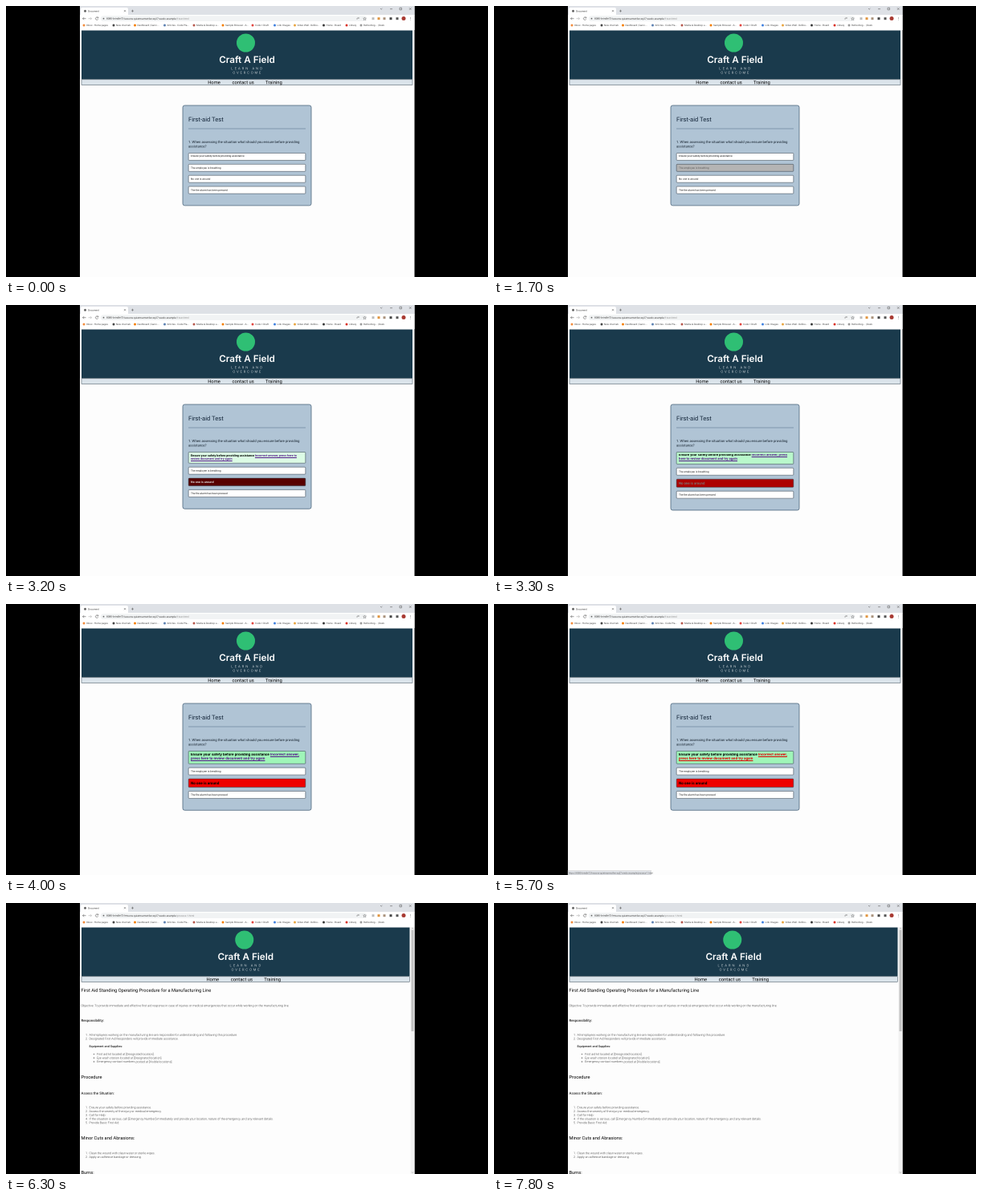
An HTML page that plays this animation: 600 px wide and 338 px high, repeating every 7.9 s.

```html
<!DOCTYPE html>
<html lang="en">
<head>
<meta charset="utf-8">
<title>First-aid test</title>
<style>
  html, body { margin: 0; height: 100%; overflow: hidden; background: #000; }
  svg { display: block; width: 100vw; height: 100vh; }
  /* The tiny turn switches off hinting, so small type keeps its true spacing. */
  text, #answer {
    font-family: Roboto, sans-serif;
    text-rendering: geometricPrecision;
    transform: rotate(.03deg);
    transform-origin: center;
  }
  text { transform-box: fill-box; }
  .logo { font-family: Inter, sans-serif; fill: #fff; text-anchor: middle; }
  #answer { line-height: 1.12; color: #000; }
  #answer a { text-decoration: underline; text-decoration-thickness: .4px; }
</style>
</head>
<body>
<svg id="stage" viewBox="0 0 600 338"></svg>
<script>
const LOOP = 7900;
const HOVER_SECOND = 1600, HOVER_THIRD = 1700, CLICK = 3085;
const STATUS_IN = 4750, PRESS = 5700, NEXT_PAGE = 5800, LOADED = 6000, STATUS_OUT = 6050;
const HOST = '8080-brindle72-lessons-quietmarmotfen-zq27.wexlo.example';
const RED = [238, 0, 0], GREEN = [159, 245, 184], WHITE = [255, 255, 255], BLACK = [0, 0, 0];
const SMALL = 3.23, LARGE = 4.65, LINE_HEIGHT = 1.12, PADDING = 5.35, GAP = 4.9;

const text = (x, y, size, content, attrs = '') =>
  `<text x="${x}" y="${y}" font-size="${size}" ${attrs}>${content}</text>`;
const rect = (x, y, w, h, fill, attrs = '') =>
  `<rect x="${x}" y="${y}" width="${w}" height="${h}" fill="${fill}" ${attrs}/>`;
const dot = (x, y, r, fill) => `<circle cx="${x}" cy="${y}" r="${r}" fill="${fill}"/>`;
const line = (d, stroke, width = 0.6) =>
  `<path d="${d}" fill="none" stroke="${stroke}" stroke-width="${width}"/>`;

function browserFrame() {
  const bookmarks = [
    [97, '#f28b3c', 'Inbox - Home pages'], [134, '#444', 'New chat tab'],
    [160.5, '#f57c00', 'Dashboard | Gain i...'], [197.5, '#5a7fb0', 'Articles - Code Pla...'],
    [234, '#b5564a', 'Media &amp; Desktop u...'], [270, '#f57c00', 'Sample Browser - A...'],
    [307, '#e0443e', 'Code + Draft'], [334.5, '#3b7ddd', 'Link Images'],
    [359.5, '#e8a33d', 'Video Wall - Define...'], [395.5, '#333', 'Home - Board'],
    [424, '#d93025', 'Library'], [442, '#999', 'Refreshing... | Desk']
  ];
  const extensions = [[457, '#bbb'], [464, '#e0943e'], [471, '#a9927c'], [479, '#444'], [487, '#555']];
  return rect(92, 0, 416.5, 338, '#fdfdfd') + rect(92, 0, 416.5, 11.5, '#dee1e6') +
    '<path d="M93 11.5V4Q93 2 95 2H150Q152 2 152 4V11.5Z" fill="#fff"/>' +
    rect(92, 11, 416.5, 19, '#fff') +
    dot(98.5, 6.3, 1.5, '#666') +
    line('M147 5.2l2 2m0-2l-2 2M156 6.2h3M157.5 4.7v3', '#444', .5) +
    line('M466 3l1.2 1.2L468.4 3M478 3.7h3M490 2.3h2.5v2.5h-2.5zM502 2.3l2.5 2.5m0-2.5l-2.5 2.5', '#444', .5) +
    rect(118, 12.3, 331, 6.8, '#f1f3f4', 'rx="3.4"') +
    line('M99.5 15.7h-4m1.5-1.5l-1.5 1.5l1.5 1.5', '#555') +
    line('M102.5 15.7h4m-1.5-1.5l1.5 1.5l-1.5 1.5', '#aaa') +
    `<g id="reload">${line('M114.6 14.7a1.7 1.7 0 1 0 .1 1.7M114.8 13.5v1.4h-1.4', '#555')}</g>` +
    `<g id="stop">${line('M111.5 14.2l3 3m0-3l-3 3', '#444')}</g>` +
    line('M437 17v-2h2.5m-1-1l1 1l-1 1M446.5 14l.6 1.3h1.3l-1 .9l.3 1.4l-1.2-.7l-1.2.7l.3-1.4l-1-.9h1.3z', '#666', .45) +
    extensions.map(([x, c]) => rect(x - 1.5, 14.2, 3, 3, c)).join('') +
    dot(495, 15.6, 2.5, '#a83a32') +
    [14.3, 15.7, 17.1].map(y => dot(503.5, y, .4, '#444')).join('') +
    bookmarks.map(([x, c, label]) => dot(x, 24, 1.5, c) + text(x + 3, 25, 3.05, label, 'fill="#444"')).join('') +
    text(102, 7.4, 3, '', 'id="tab" fill="#333"') +
    dot(121.5, 15.7, .9, '#666') +
    `<text x="125" y="16.9" font-size="3.2" fill="#333">${HOST}<tspan id="path" fill="#888"></tspan></text>`;
}

function siteHeader(width) {
  const mid = 94 + width / 2;
  return rect(94, 30.5, width, 61, '#1a3a4c') +
    dot(mid - 1.5, 46, 11.5, '#2fbf74') +
    text(mid, 71, 11.7, 'Craft A Field', 'class="logo" font-weight="600"') +
    text(mid + .7, 79.2, 4, 'LEARN AND', 'class="logo" font-weight="300" letter-spacing="2"') +
    text(mid + .7, 84.6, 4, 'OVERCOME', 'class="logo" font-weight="300" letter-spacing="1.8"') +
    rect(94, 91.8, width, 6.9, '#dbe4eb', 'stroke="#3f4d58" stroke-width=".5"') +
    [[-48.8, 'Home'], [-18.5, 'contact us'], [23, 'Training']]
      .map(([dx, label]) => text(mid + dx, 97.3, 5.8, label)).join('');
}

function testPage() {
  const labels = ['', 'The employee is breathing', 'No one is around', 'The fire alarm has been pressed'];
  const option = label => `<g class="option">
    ${rect(227.2, 0, 145.6, 9, '#fff', 'rx=".8" stroke="#2b3742" stroke-width=".5"')}
    ${text(230, 0, SMALL, label)}</g>`;
  return siteHeader(412) +
    rect(220, 124, 160, 125, '#b0c4d5', 'id="card" rx="2.5" stroke="#3a566f" stroke-width=".7"') +
    text(227, 144, 7.6, 'First-aid Test', 'fill="#14263a"') +
    line('M227 153H373', '#5b7890', .6) +
    text(227, 171, 4.29, '1. When assessing the situation what should you ensure before providing', 'fill="#14202c"') +
    text(227, 176.5, 4.29, 'assistance?', 'fill="#14202c"') +
    labels.map(option).join('') +
    `<foreignObject x="230" y="186.1" width="142" height="16">
      <div xmlns="http://www.w3.org/1999/xhtml" id="answer">Ensure your safety before providing assistance <a id="link">Incorrect answer, press here to review document and try again</a></div>
    </foreignObject>`;
}

function procedurePage() {
  const pitch = 4.72;
  const heading = (y, label) => text(93.5, y, 5.7, label);
  const subheading = (y, label, x = 93.5, size = 4.36) => text(x, y, size, label, 'font-weight="500" fill="#222"');
  const body = (x, y, label) => text(x, y, 3.78, label, 'font-weight="300" fill="#222"');
  const numbered = (y, items) => items.map((item, i) =>
    body(99, y + i * pitch, `${i + 1}.`) + body(103.5, y + i * pitch, item)).join('');
  const bulleted = (y, items) => items.map((item, i) =>
    dot(109.5, y - 1.2 + i * pitch, .6, '#333') + body(113, y + i * pitch, item)).join('');
  return siteHeader(408.5) +
    rect(503.5, 30, 5, 308, '#f1f1f1') + rect(504.5, 33.5, 3, 126.5, '#c1c1c1') +
    line('M505 32.2l1-1l1 1M505 335.5l1 1l1-1', '#777', .5) +
    heading(110.8, 'First Aid Standing Operating Procedure for a Manufacturing Line') +
    body(93.5, 129.3, 'Objective: To provide immediate and effective first aid response in case of injuries or medical emergencies that occur while working on the manufacturing line.') +
    subheading(148, 'Responsibility:') +
    numbered(165.8, [
      'All employees working on the manufacturing line are responsible for understanding and following this procedure.',
      'Designated First Aid Responders will provide immediate assistance.']) +
    subheading(180, 'Equipment and Supplies:', 103.5, 3.78) +
    bulleted(189.7, [
      'First aid kit located at [Designated location].',
      'Eye wash station located at [Designated location].',
      'Emergency contact numbers posted at [Visible locations].']) +
    heading(219, 'Procedure') +
    subheading(238.8, 'Assess the Situation:') +
    numbered(256.3, [
      'Ensure your safety before providing assistance.',
      'Assess the severity of the injury or medical emergency.',
      'Call for Help:',
      'If the situation is serious, call [Emergency Number] immediately and provide your location, nature of the emergency, and any relevant details.',
      'Provide Basic First Aid:']) +
    heading(295, 'Minor Cuts and Abrasions:') +
    numbered(313.3, [
      'Clean the wound with clean water or sterile wipes.',
      'Apply an adhesive bandage or dressing.']) +
    heading(338, 'Burns:');
}

const statusBar = () =>
  rect(92, 332.8, 103.5, 5.2, '#dee1e6', 'stroke="#bbb" stroke-width=".4"') +
  text(93, 336.5, 2.8, `https://${HOST}/process-1.html`, 'fill="#555"');

document.getElementById('stage').innerHTML = browserFrame() +
  `<g id="test">${testPage()}</g><g id="procedure">${procedurePage()}</g><g id="status">${statusBar()}</g>`;

const part = id => document.getElementById(id);
const options = [...document.querySelectorAll('.option')].map(g => ({
  box: g.querySelector('rect'), label: g.querySelector('text')
}));

const clamp = v => Math.min(1, Math.max(0, v));
const mix = (a, b, p) => a.map((v, i) => v + (b[i] - v) * p);
const rgb = c => `rgb(${c.map(Math.round)})`;
const show = (id, on) => part(id).setAttribute('display', on ? 'inline' : 'none');

function setAll(node, attrs) {
  for (const name in attrs) node.setAttribute(name, attrs[name]);
}

// The CSS "ease" curve, cubic-bezier(.25, .1, .25, 1)
function ease(x) {
  x = clamp(x);
  const curve = (s, a, b) => 3 * s * (1 - s) ** 2 * a + 3 * s * s * (1 - s) * b + s ** 3;
  let low = 0, high = 1;
  for (let i = 0; i < 20; i++) {
    const s = (low + high) / 2;
    if (curve(s, .25, .25) < x) low = s; else high = s;
  }
  return curve(low, .1, 1);
}

function drawOptions(t) {
  const clicked = t >= CLICK;
  const reveal = ease((t - CLICK) / 500);
  const passing = t < HOVER_THIRD
    ? ease((t - HOVER_SECOND) / 500)
    : ease(.2) * (1 - ease((t - HOVER_THIRD) / 250));
  const hover = [0, passing, ease((t - HOVER_THIRD) / 500), 0];
  const markedSize = SMALL + (LARGE - SMALL) * reveal;
  let y = 183.5;

  options.forEach(({ box, label }, i) => {
    const marked = clicked && (i === 0 || i === 2);
    const size = marked ? markedSize : SMALL;
    const lines = marked && i === 0 ? 2 : 1;
    const height = lines * LINE_HEIGHT * size + PADDING;
    let fill = mix(WHITE, BLACK, hover[i]), ink = mix([20, 20, 20], WHITE, hover[i]);
    if (marked) {
      fill = mix(fill, i ? RED : GREEN, reveal);
      ink = mix(ink, BLACK, reveal ** 2);
    }
    setAll(box, { y, height, fill: rgb(fill) });
    setAll(label, {
      y: y + height / 2 + size * .35, 'font-size': size,
      'font-weight': marked ? 700 : 400, fill: rgb(ink)
    });
    y += height + GAP;
  });

  part('card').setAttribute('height', y - GAP + 14.8 - 124);
  const answer = part('answer').style, link = part('link').style;
  answer.fontSize = `${clicked ? markedSize : SMALL}px`;
  answer.fontWeight = clicked ? 700 : 400;
  link.display = clicked ? 'inline' : 'none';
  link.color = t >= PRESS ? '#e00000' : '#551a8b';
}

function draw(t) {
  const next = t >= NEXT_PAGE, loading = next && t < LOADED;
  show('test', !next);
  show('procedure', next);
  show('reload', !loading);
  show('stop', loading);
  part('tab').textContent = loading ? '8080-brindle72-lessons-quietm' : 'Document';
  part('path').textContent = next ? '/process-1.html' : '/f-test.html';
  part('status').setAttribute('opacity', clamp((t - STATUS_IN) / 250) * (1 - clamp((t - STATUS_OUT) / 250)));
  if (!next) drawOptions(t);
}

const start = performance.now();
function tick() {
  draw((performance.now() - start) % LOOP);
  requestAnimationFrame(tick);
}
tick();
</script>
</body>
</html>
```
